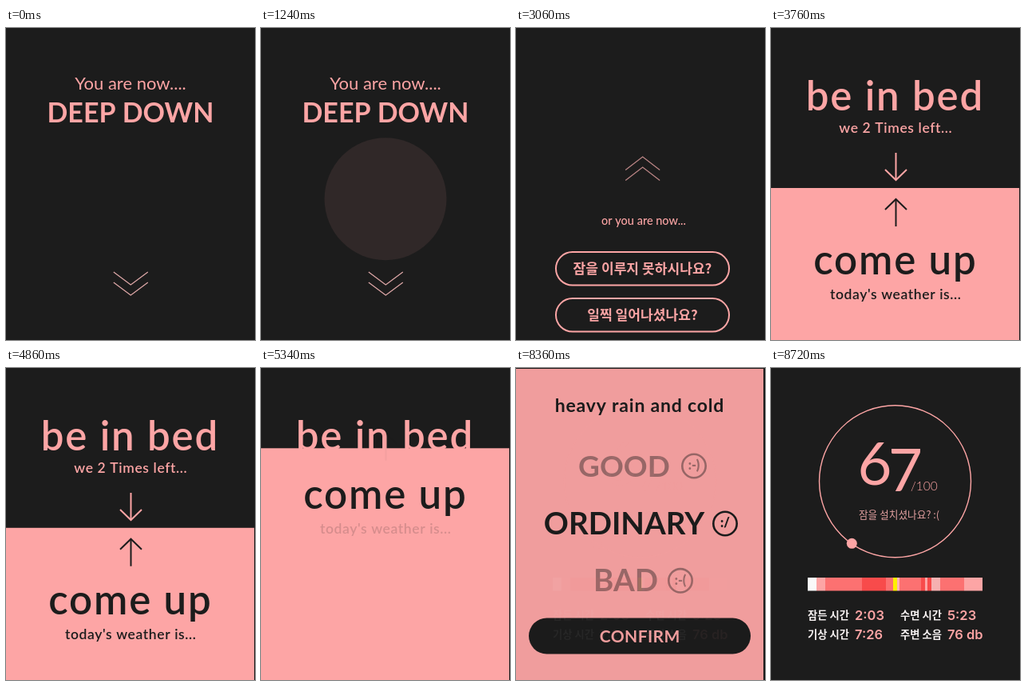
These frames come from a looping animation (312x390 px, 10 s). An HTML page with a canvas:

```html
<!DOCTYPE html>
<html lang="ko">
<head>
<meta charset="utf-8">
<title>Sleep app</title>
<style>
html, body { margin: 0; width: 100%; height: 100%; overflow: hidden; background: #1c1c1c; }
canvas { display: block; width: 312px; height: 390px; }
</style>
</head>
<body>
<canvas id="stage"></canvas>
<script>
const W = 312, H = 390, LOOP = 10000;
const DARK = '#1c1c1c', PINK = '#fda5a5';
const LATIN = 'Lato, "Open Sans", sans-serif';
const KOREAN = '"Noto Sans CJK KR", "Noto Sans CJK", "Noto Sans CJK JP", sans-serif';
const DIGITS = 'Inter, Roboto, sans-serif';
const WIDE = { weight: 600, spacing: 0.035 };

const canvas = document.getElementById('stage');
const ctx = canvas.getContext('2d');
const dpr = window.devicePixelRatio || 1;
canvas.width = Math.round(W * dpr);
canvas.height = Math.round(H * dpr);

const clamp = v => Math.max(0, Math.min(1, v));
const progress = (t, from, to) => clamp((t - from) / (to - from));

function fill(color, x = 0, y = 0, w = W, h = H) {
  ctx.fillStyle = color;
  ctx.fillRect(x, y, w, h);
}

// Letter spacing is given in em.
function text(str, x, y, size, color, { weight = 400, family = LATIN, align = 'center', spacing = 0 } = {}) {
  const gap = size * spacing;
  ctx.font = `${weight} ${size}px ${family}`;
  ctx.letterSpacing = `${gap}px`;
  ctx.textAlign = align;
  ctx.fillStyle = color;
  ctx.fillText(str, align === 'center' ? x + gap / 2 : x, y);
}

function line(color, width, ...points) {
  ctx.beginPath();
  points.forEach(([x, y]) => ctx.lineTo(x, y));
  ctx.strokeStyle = color;
  ctx.lineWidth = width;
  ctx.stroke();
}

function circle(x, y, r) {
  ctx.beginPath();
  ctx.arc(x, y, r, 0, Math.PI * 2);
}

function pill(x, y, w, h) {
  ctx.beginPath();
  ctx.roundRect(x, y, w, h, h / 2);
}

function withAlpha(alpha, draw) {
  ctx.save();
  ctx.globalAlpha *= alpha;
  draw();
  ctx.restore();
}

// Two stacked chevrons; a positive depth points down.
function chevrons(x, y, depth, color) {
  for (const dy of [0, 13]) {
    line(color, 1.3, [x - 21.5, y + dy], [x, y + dy + depth], [x + 21.5, y + dy]);
  }
}

function arrow(tipY, dir, color) {
  const x = 156.5;
  line(color, 2, [x, tipY - 34 * dir], [x, tipY]);
  line(color, 2, [x - 13.5, tipY - 13 * dir], [x, tipY], [x + 13.5, tipY - 13 * dir]);
}

function scrollAt(t) {
  const speed = 0.285, start = 2120, ramp = 72;
  const dt = Math.min(t, 3300) - start;
  if (dt <= 0) return 0;
  return dt < ramp ? speed * dt * dt / (2 * ramp) : speed * (dt - ramp / 2);
}

function choice(str, y) {
  pill(50, y, 217, 41.5);
  ctx.strokeStyle = PINK;
  ctx.lineWidth = 2;
  ctx.stroke();
  text(str, 158.5, y + 27.3, 17.1, PINK, { weight: 700, family: KOREAN });
}

function drawIntro(t) {
  fill(DARK);
  ctx.save();
  ctx.translate(0, -scrollAt(t));
  withAlpha(1 - progress(t, 2340, 2960), () => {
    text('You are now....', 156, 76.5, 22, PINK);
    text('DEEP DOWN', 156, 117.5, 34, PINK, { weight: 700 });
    withAlpha(0.145 * progress(t, 20, 2060), () => {
      circle(156, 213.7, 76.5);
      ctx.fillStyle = PINK;
      ctx.fill();
    });
    chevrons(156.3, 305, 16, '#dba5a5');
  });
  chevrons(158.7, 435.5, -16.5, '#b98484');
  text('or you are now...', 160, 504, 14.5, PINK, { weight: 500 });
  choice('잠을 이루지 못하시나요?', 538);
  choice('일찍 일어나셨나요?', 596);
  ctx.restore();
}

function drawSwipe(t) {
  const p = progress(t, 4860, 5820);
  const edge = 200 - 199 * p;
  fill(DARK);
  text('be in bed', 154.5, 103, 51, PINK, WIDE);
  text('we 2 Times left...', 156, 131, 17.5, PINK, WIDE);
  arrow(190, 1, PINK);
  fill(PINK, 0, edge, 311, H - edge);
  ctx.save();
  ctx.translate(0, -264 * p);
  withAlpha(1 - progress(t, 4860, 5360), () => arrow(214, -1, DARK));
  text('come up', 155, 308, 51, DARK, WIDE);
  withAlpha(1 - progress(t, 4860, 5440), () =>
    text("today's weather is...", 156, 339, 17.5, DARK, WIDE));
  ctx.restore();
}

function mood(word, face, x, baseline, size, faceX, alpha) {
  withAlpha(alpha, () => {
    const y = baseline - 13.5;
    text(word, x, baseline, size, DARK, { weight: 700 });
    circle(faceX, y, 14.7);
    ctx.strokeStyle = DARK;
    ctx.lineWidth = 2.6;
    ctx.stroke();
    text(face, faceX, y + 4.8, 16, DARK, { weight: 900 });
  });
}

function drawMood() {
  fill(DARK);
  fill(PINK, 0, 1, 310, H);
  text('heavy rain and cold', 154.5, 55, 23, DARK, { weight: 700, spacing: 0.035 });
  mood('GOOD', ':-)', 135.5, 136, 37, 223, 0.42);
  mood('ORDINARY', ':/', 135.5, 208, 38.5, 262, 1);
  mood('BAD', ':-(', 137.5, 279.3, 38.5, 206, 0.42);
  pill(16, 312.5, 278, 45);
  ctx.fillStyle = DARK;
  ctx.fill();
  text('CONFIRM', 155, 343, 21, PINK, { weight: 700, spacing: 0.02 });
}

// Sleep phases: start x and colour; each runs to the next one.
const PHASES = [
  [46, '#fafafa'], [57, PINK], [68, '#fc7171'], [114, '#f84b4b'],
  [144, '#fc7171'], [153, '#fff000'], [158, '#fdb5b5'], [161, '#fc7171'],
  [188, '#f84b4b'], [193, PINK], [196, '#f84b4b'], [201, '#f6b0b0'],
  [212, '#fc7171'], [242, PINK], [265]
];

function stat(label, value, x, y) {
  text(label, x, y, 13.3, '#f5f0f0', { weight: 700, family: KOREAN, align: 'left' });
  text(value, x + 59, y + 1, 16.5, PINK, { weight: 600, family: DIGITS, align: 'left' });
}

function drawScore() {
  fill(DARK);
  circle(155.5, 141.8, 95);
  ctx.strokeStyle = PINK;
  ctx.lineWidth = 1.4;
  ctx.stroke();
  circle(101.3, 219.3, 6.5);
  ctx.fillStyle = PINK;
  ctx.fill();
  text('6', 130, 145.5, 74, PINK);
  text('7', 168.5, 154, 74, PINK);
  text('/100', 175, 152.5, 15.5, PINK, { weight: 300, align: 'left' });
  text('잠을 설치셨나요? :(', 160.5, 187.5, 12.7, '#e3a0a0', { family: KOREAN });
  PHASES.slice(0, -1).forEach(([x, color], i) => fill(color, x, 262, PHASES[i + 1][0] - x, 16.5));
  stat('잠든 시간', '2:03', 46, 314);
  stat('수면 시간', '5:23', 162, 314);
  stat('기상 시간', '7:26', 46, 338.3);
  stat('주변 소음', '76 db', 162, 338.3);
}

function render(t) {
  ctx.setTransform(canvas.width / W, 0, 0, canvas.height / H, 0, 0);
  ctx.globalAlpha = 1;
  if (t < 3760) drawIntro(t);
  else if (t < 6460) drawSwipe(t);
  else {
    const fade = progress(t, 8340, 8720);
    if (fade < 1) drawMood();
    if (fade > 0) withAlpha(fade, drawScore);
  }
}

function tick() {
  render(performance.now() % LOOP);
  requestAnimationFrame(tick);
}
tick();
</script>
</body>
</html>
```
